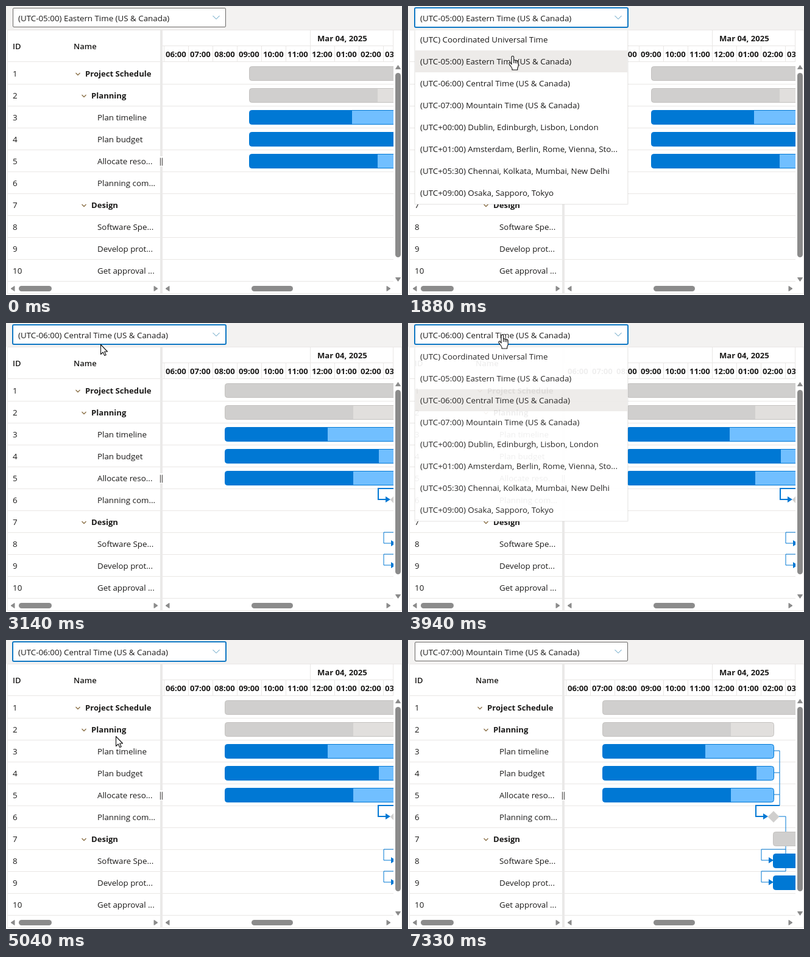
These frames come from a looping animation (650 px wide and 475 px high, 7.4 s). An HTML page:

```html
<!DOCTYPE html>
<html lang="en">
<head>
<meta charset="utf-8">
<title>Schedule time zone picker</title>
<style>
html, body { margin: 0; width: 100%; height: 100%; overflow: hidden; background: #fff; }
#stage { display: block; width: 650px; height: 475px; }
text { font: 13.35px "Open Sans", "Noto Sans", sans-serif; fill: #1b1a19; white-space: pre; }
.strong { font-weight: 700; font-size: 13.1px; }
.head { font-weight: 600; font-size: 13px; }
.line { stroke: #e9e7e5; fill: none; }
.thumb { fill: #8b8b8b; }
.thumb path { stroke: #8b8b8b; stroke-linejoin: round; }
.link { fill: none; stroke: #0078d4; }
.twist { fill: none; stroke: #8a6f45; stroke-width: 1.3; }

/* 1% of the loop = 74 ms */
.anim { animation: 7400ms step-end infinite; }
#focus { animation-name: focus; }
#labels { animation-name: label; }
#chart { animation-name: shift; }
#popup { animation-name: popup; }
#picked { animation-name: picked; }
#hover { animation-name: hover; }
#pointer { animation-name: present; }
#move { animation-name: move; }
#arrow { animation-name: arrow; }
#hand { animation-name: hand; }

@keyframes focus {
  0%, 99.05%, 100% { opacity: 0; }
  19.86% { opacity: 1; }
}
@keyframes label {
  0% { transform: translateY(0); }
  39.59% { transform: translateY(-40px); }
  71.75%, 100% { transform: translateY(-80px); }
}
@keyframes shift {
  0% { transform: translateX(80px); }
  39.59% { transform: translateX(40px); }
  71.75%, 100% { transform: translateX(0); }
}
@keyframes popup {
  0% { opacity: 0; }
  23.51% { opacity: .5; animation-timing-function: steps(2, end); }
  25.4% { opacity: 1; }
  33.78% { opacity: .8; animation-timing-function: steps(3, end); }
  36.62% { opacity: 0; }
  52.29% { opacity: .5; }
  53.24% { opacity: .93; }
  54.18% { opacity: 1; }
  62.7% { opacity: .8; animation-timing-function: steps(4, end); }
  66.35%, 100% { opacity: 0; }
}
@keyframes picked {
  0% { transform: translateY(36px); }
  32.83% { transform: translateY(72px); }
  59.86%, 100% { transform: translateY(108px); }
}
@keyframes hover {
  0% { transform: translateY(36px); }
  27.29% { transform: translateY(72px); }
  58.78%, 100% { transform: translateY(108px); }
}
@keyframes present {
  0%, 93.64%, 100% { opacity: 0; }
  7.02% { opacity: 1; }
}
@keyframes move {
  0% { transform: translate(560px, 453px); }
  7.02% { transform: translate(560px, 453px); animation-timing-function: steps(10, end); }
  16.21% { transform: translate(169px, 37px); }
  17.16% { transform: translate(171px, 31px); animation-timing-function: steps(3, end); }
  20.81% { transform: translate(173px, 20px); }
  23.51% { transform: translate(173px, 41px); animation-timing-function: steps(2, end); }
  25.4% { transform: translate(172px, 82px); animation-timing-function: steps(5, end); }
  30.13% { transform: translate(168px, 126px); }
  34.05% { transform: translate(168px, 126px); animation-timing-function: steps(9, end); }
  42.43% { transform: translate(155px, 35px); }
  43.24% { transform: translate(155px, 30px); animation-timing-function: steps(2, end); }
  45.13% { transform: translate(155px, 19px); }
  49.59% { transform: translate(156px, 14px); }
  50.54% { transform: translate(156px, 8px); }
  52.29% { transform: translate(155px, 19px); }
  54.18% { transform: translate(157px, 45px); animation-timing-function: steps(5, end); }
  58.78% { transform: translate(176px, 150px); }
  59.86% { transform: translate(178px, 154px); }
  61.75% { transform: translate(180px, 158px); }
  84.32% { transform: translate(205px, 178px); animation-timing-function: steps(10, end); }
  93.64%, 100% { transform: translate(593px, 491px); }
}
@keyframes arrow {
  0%, 36.62%, 66.35%, 100% { opacity: 1; }
  17.16%, 43.24% { opacity: 0; }
}
@keyframes hand {
  0%, 36.62%, 66.35%, 100% { opacity: 0; }
  17.16%, 43.24% { opacity: 1; }
}
</style>
</head>
<body>
<svg id="stage" viewBox="0 0 650 475">
  <rect width="650" height="475" fill="#fff"/>
  <rect width="650" height="39" fill="#f3f2f1"/>
  <rect class="line" x="2.5" y="39.5" width="647" height="433" style="fill:#fff"/>

  <g id="table">
    <text class="head" x="11" y="71">ID</text>
    <text class="head" x="111" y="71">Name</text>
  </g>

  <svg x="257" y="40" width="379" height="52" viewBox="257 40 379 52">
    <path class="line" d="M257 65.5H636M499.5 40V66M635.5 40V92"/>
    <text class="strong" x="511" y="58">Mar 04, 2025</text>
    <g id="hours"></g>
  </svg>

  <svg x="257" y="93" width="379" height="361" viewBox="257 93 379 361">
    <g id="chart" class="anim">
      <path class="link" d="M601 182H610V272M601 218H610M601 254H610"/>
      <path class="link" stroke-width="2" d="M610 272H571V290H584"/>
      <path class="link" d="M608 290H620V380M620 344H580V362H593M620 380H580V398H593"/>
      <path fill="#0078d4" d="M583 285l8 5-8 5zM592 357l8 5-8 5zM592 393l8 5-8 5z"/>
      <path fill="#d0cfce" d="M600 281l9.5 9.5-9.5 9.5-9.5-9.5z"/>
      <g id="bars"></g>
    </g>
  </svg>

  <rect x="253" y="40" width="4" height="432" fill="#eae9e8"/>
  <rect x="251" y="247" width="8" height="17" fill="#fff"/>
  <path d="M253.5 249.5V262.5M256.5 249.5V262.5" stroke="#605e5c" stroke-width="1.3"/>

  <rect x="258" y="454" width="391" height="18" fill="#fff"/>
  <g class="thumb">
    <rect x="21" y="460" width="54" height="9" rx="4.5"/>
    <rect x="403" y="460" width="68" height="9" rx="4.5"/>
    <rect x="639" y="110" width="9" height="303" rx="4.5"/>
    <path d="M14 460.5v8l-6-4zM243 460.5v8l6-4zM268 460.5v8l-6-4zM625 460.5v8l6-4zM639.5 103.5h8l-4-6zM639.5 446.5h8l-4 6z"/>
  </g>

  <rect x="11.5" y="3.5" width="349" height="31" rx="1.5" fill="#fff" stroke="#6b6967"/>
  <rect id="focus" class="anim" x="11" y="3" width="350" height="32" rx="2" fill="#fff" stroke="#0f78c4" stroke-width="2"/>
  <path d="M339.5 16l5.5 5.5 5.5-5.5" fill="none" stroke="#4f97bd"/>
  <svg x="14" y="6" width="320" height="26" viewBox="14 6 320 26">
    <g id="labels" class="anim"></g>
  </svg>

  <g id="popup" class="anim">
    <rect x="10" y="40" width="352" height="287" rx="2" fill="#000" opacity=".05"/>
    <rect x="11.5" y="39.5" width="349" height="286" fill="#fff" stroke="#eeedec"/>
    <rect id="hover" class="anim" x="12" y="37" width="348" height="36" fill="#f3f2f1"/>
    <rect id="picked" class="anim" x="12" y="37" width="348" height="36" fill="#edebe9"/>
    <g id="zones"></g>
  </g>

  <g id="pointer" class="anim"><g id="move" class="anim" fill="#fff" stroke="#111" stroke-width="1.1" stroke-linejoin="round">
    <path id="arrow" class="anim" d="M.5.5V16.5L4.2 13 6.8 18.5 9.2 17.5 6.7 12H11.5Z"/>
    <g id="hand" class="anim">
      <path d="M-2 2a1.8 1.8 0 0 1 3.6 0V8c0-1.8 2.8-1.6 2.8.3c.2-1.4 2.6-1.2 2.6.6c.2-1.2 2.2-1 2.2.9V16c0 2-1.5 3-1.5 5V23H-1V21c0-2-4-5-5-8c-.8-1.8 1.3-2.8 2.3-1.3L-2 14Z"/>
      <path fill="none" d="M1.6 8v4M4.4 8.3v4M7 8.9v3.5"/>
    </g>
  </g></g>
</svg>
<script>
const ROW = 36;
const add = (id, html) => document.getElementById(id).insertAdjacentHTML('beforeend', html);
const text = (x, y, s, cls = '') =>
  `<text x="${x}" y="${y}" class="${cls}">${s.replace('&', '&amp;')}</text>`;

// Task tree: name and depth
const tasks = [
  ['Project Schedule', 0], ['Planning', 1], ['Plan timeline', 2], ['Plan budget', 2],
  ['Allocate reso...', 2], ['Planning com...', 2], ['Design', 1],
  ['Software Spe...', 2], ['Develop prot...', 2], ['Get approval ...', 2]
];
add('table', '<path class="line" d="M3 91.5H636"/>');
tasks.forEach(([name, depth], i) => {
  const x = 130 + depth * 10, y = 116 + i * ROW;
  add('table', text(11, y, String(i + 1)) + text(x, y, name, depth < 2 ? 'strong' : ''));
  if (depth < 2) add('table', `<path class="twist" d="M${x - 15.5} ${y - 6}l3.5 3.5 3.5-3.5"/>`);
  add('table', `<path class="line" d="M3 ${128.5 + i * ROW}H636"/>`);
});

for (let i = 0; i < 10; i++) {
  const hour = String((5 + i) % 12 + 1).padStart(2, '0');
  const x = 259.5 + i * 40;
  add('hours', `<path class="line" d="M${x} 66V92"/>` + text(x + 2.5, 84, hour + ':00', 'strong'));
}

const BLUE = ['#0078d4', '#71bfff', '#0078d4'];
const GREY = ['#d0cfce', '#e1dfdd', '#c4c2c0'];
function bar(row, x, width, done, [fill, rest, edge]) {
  const y = 99.5 + (row - 1) * ROW;
  const box = `x="${x + .5}" y="${y}" width="${width - 1}" height="23" rx="4"`;
  add('bars', `<clipPath id="done${row}"><rect x="${x}" y="${y - 1}" width="${done}" height="25"/></clipPath>
    <rect ${box} fill="${rest}"/>
    <rect ${box} fill="${fill}" clip-path="url(#done${row})"/>
    <rect ${box} fill="none" stroke="${edge}"/>`);
}
bar(1, 319, 600, 500, GREY);
bar(2, 319, 282, 211, GREY);
bar(3, 319, 282, 169, BLUE);
bar(4, 319, 282, 253, BLUE);
bar(5, 319, 282, 211, BLUE);
bar(7, 599, 300, 200, GREY);
bar(8, 599, 300, 200, BLUE);
bar(9, 599, 300, 200, BLUE);

const zones = [
  '(UTC) Coordinated Universal Time',
  '(UTC-05:00) Eastern Time (US & Canada)',
  '(UTC-06:00) Central Time (US & Canada)',
  '(UTC-07:00) Mountain Time (US & Canada)',
  '(UTC+00:00) Dublin, Edinburgh, Lisbon, London',
  '(UTC+01:00) Amsterdam, Berlin, Rome, Vienna, Sto...',
  '(UTC+05:30) Chennai, Kolkata, Mumbai, New Delhi',
  '(UTC+09:00) Osaka, Sapporo, Tokyo'
];
zones.forEach((zone, i) => add('zones', text(20, 60 + i * ROW, zone)));
zones.slice(1, 4).forEach((zone, i) => add('labels', text(20, 25 + i * 40, zone)));
</script>
</body>
</html>
```
